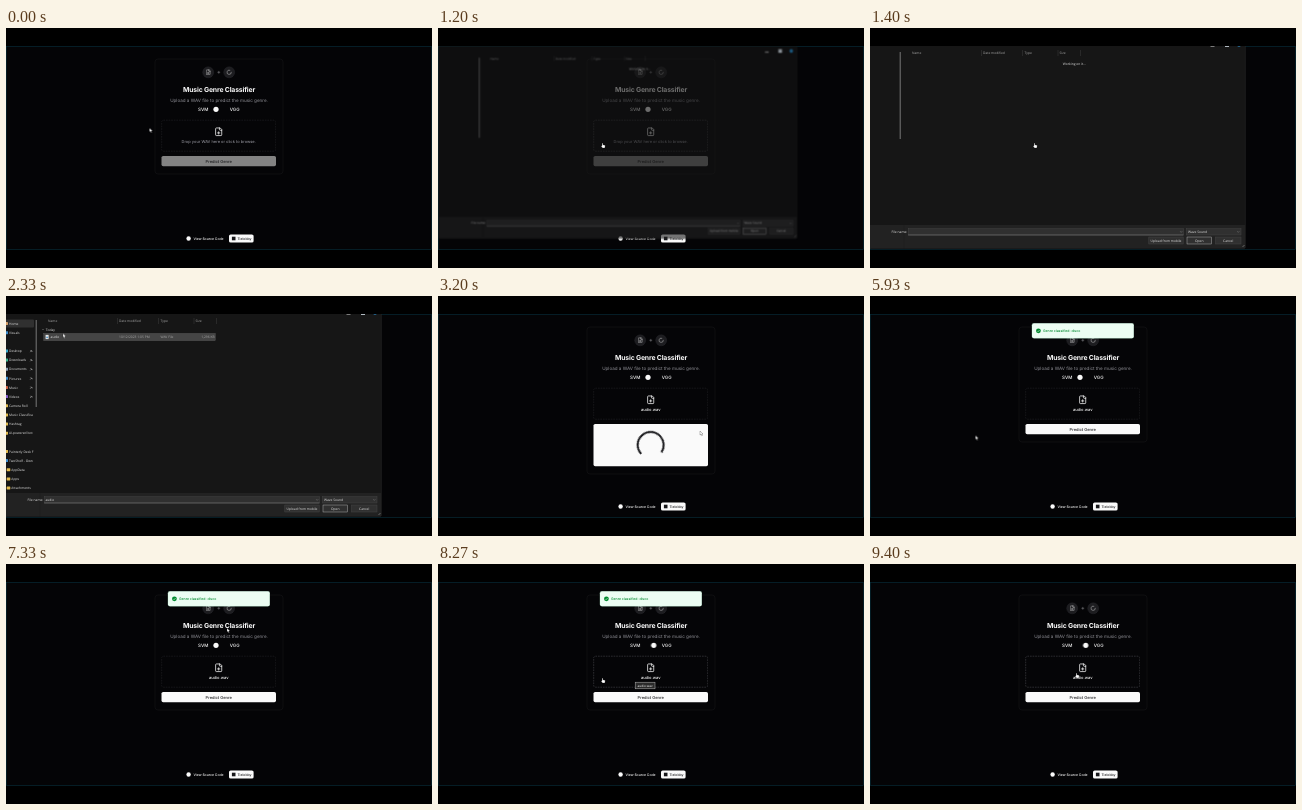
Recreate the animation shown at these times as an HTML page. Size 426 by 240 pixels, loop 9.47 s.

```html
<!DOCTYPE html>
<html lang="en">
<head>
<meta charset="utf-8">
<title>Music Genre Classifier</title>
<style>
html, body { margin: 0; width: 100%; height: 100%; overflow: hidden; background: #000; }
svg { display: block; width: 100vw; height: 100vh; }
text { font-family: Inter, sans-serif; fill: #fafafa; text-rendering: geometricPrecision; }
.mid { text-anchor: middle; }
.end { text-anchor: end; }
.title { font-size: 6.86px; font-weight: 700; letter-spacing: -.025em; }
.lead { font-size: 4.57px; fill: #929299; }
.opt { font-size: 4.57px; font-weight: 500; }
.body { font-size: 4px; }
.strong { font-weight: 500; }
.foot { font-size: 3.43px; font-weight: 500; }
.ink { fill: #18181b; }
.line { fill: none; stroke: #fafafa; stroke-width: 2; stroke-linecap: round; stroke-linejoin: round; }
.win text { font: 3.3px "Open Sans", "Noto Sans", sans-serif; fill: #e4e4e4; }
.win .dim { fill: #a8a8a8; }
.field { fill: #303030; stroke: #4a4a4a; stroke-width: .4; }

/* One shared 9.47 s timeline */
.card, .btn, .thumb, .zone, .before, .after, .wait, .list, .picked,
.idle, .busy, .tip, .arrow, .hand { animation: 9470ms step-end infinite; }
.card, .btn { height: var(--h); }
.card { --h: 115px; animation-name: grow; }
.btn { --h: 10.3px; fill: #838383; animation-name: grow, enable; }
.thumb { animation-name: toggle; }
.zone { stroke: #222225; animation-name: hover; }
.before { animation-name: before; }
.after { animation-name: after; }
.wait { animation-name: wait; }
.list { animation-name: list; }
.picked { animation-name: picked; }
.idle { animation-name: idle; }
.busy { animation-name: busy; }
.tip { animation-name: tip; }
.arrow { animation-name: arrow; }
.hand { animation-name: hand; }
.spin { animation: spin 947ms linear infinite; }
.win { transform-origin: 170px 95px; animation: win 9470ms linear infinite; }
.toast { animation: toast 9470ms ease infinite; }
.cursor { animation: cursor 9470ms ease-in-out infinite; }

@keyframes grow { 0%, 48.57%, 100% { height: var(--h); } 33.79% { height: calc(var(--h) + 32px); } }
@keyframes enable { 0% { fill: #838383; } 29.2%, 100% { fill: #fafafa; } }
@keyframes toggle { 0% { transform: none; } 77.8%, 100% { transform: translateX(5.7px); } }
@keyframes hover {
  0%, 14.9%, 87.9% { stroke: #222225; }
  2.2%, 81%, 99.26%, 100% { stroke: #46464b; }
}
@keyframes hand { 0%, 14.9%, 87.9% { opacity: 0; } 2.2%, 81%, 99.26%, 100% { opacity: 1; } }
@keyframes arrow { 0%, 14.9%, 87.9% { opacity: 1; } 2.2%, 81%, 99.26%, 100% { opacity: 0; } }
@keyframes before { 0% { opacity: 1; } 29.2%, 100% { opacity: 0; } }
@keyframes after { 0% { opacity: 0; } 29.2%, 100% { opacity: 1; } }
@keyframes wait { 0% { opacity: 1; } 14.8%, 100% { opacity: 0; } }
@keyframes list { 0% { opacity: 0; } 14.8%, 100% { opacity: 1; } }
@keyframes picked { 0% { opacity: 0; } 21.75%, 100% { opacity: 1; } }
@keyframes idle { 0%, 48.57%, 100% { opacity: 1; } 33.79% { opacity: 0; } }
@keyframes busy { 0%, 48.57%, 100% { opacity: 0; } 33.79% { opacity: 1; } }
@keyframes tip { 0%, 90.07%, 100% { opacity: 0; } 85.6% { opacity: 1; } }
@keyframes spin { to { transform: rotate(360deg); } }
@keyframes win {
  0%, 11.6% { opacity: 0; transform: scale(.9); }
  12.67% { opacity: .62; transform: scale(.92); }
  14.1%, 29.15% { opacity: 1; transform: none; }
  30.4%, 100% { opacity: 0; transform: scale(.93); }
}
@keyframes toast {
  0%, 48.92% { opacity: 0; transform: translateY(-15px); }
  53.15%, 91.3% { opacity: 1; transform: none; }
  93.6%, 100% { opacity: 0; transform: translateY(-15px); }
}
@keyframes cursor {
  0%, 1.37% { transform: translate(143.5px, 100px); }
  7.08%, 8.45% { transform: translate(233px, 112px); }
  9.19%, 11.3% { transform: translate(207px, 107px); }
  12.67%, 14.8% { transform: translate(164px, 115px); }
  21.1%, 24.7% { transform: translate(57px, 37.5px); }
  28.5%, 29.57% { transform: translate(329px, 211px); }
  32.42%, 36.64% { transform: translate(262px, 135px); }
  46.46%, 61.98% { transform: translate(104px, 139.5px); }
  62.62%, 71.07% { transform: translate(105.5px, 139.5px); }
  73.92% { transform: translate(218px, 36px); }
  75.3%, 77.4% { transform: translate(221px, 64px); }
  78.14%, 79.5% { transform: translate(214px, 80px); }
  81.84% { transform: translate(230px, 105px); }
  83.42%, 85.85% { transform: translate(200px, 112px); }
  87.33% { transform: translate(164px, 114px); }
  90.07%, 91.5% { transform: translate(118px, 112px); }
  93.66%, 98.52% { transform: translate(124px, 112px); }
  99.26%, 100% { transform: translate(206px, 109px); }
}
</style>
</head>
<body>
<svg viewBox="0 0 426 240">
  <defs>
    <clipPath id="screen"><rect y="18" width="426" height="204"/></clipPath>
    <g id="file" class="line">
      <path d="M15 2H6a2 2 0 0 0-2 2v16a2 2 0 0 0 2 2h12a2 2 0 0 0 2-2V7Z"/>
      <path d="M14 2v4a2 2 0 0 0 2 2h4M9 15h6M12 18v-6"/>
    </g>
  </defs>
  <rect width="426" height="240"/>
  <g clip-path="url(#screen)">
    <rect x=".4" y="18.3" width="425.2" height="203.2" fill="#040406" stroke="#08303c" stroke-width=".6"/>

    <!-- Card -->
    <rect class="card" x="149" y="31" width="128" rx="3" fill="#050507" stroke="#18181b" stroke-width=".5"/>
    <g fill="#1d1d20" stroke="#2c2c30" stroke-width=".4">
      <circle cx="202.2" cy="44.3" r="5.5"/>
      <circle cx="223.2" cy="44.3" r="5.5"/>
    </g>
    <g opacity=".8">
      <use href="#file" transform="translate(199.3 41.4) scale(.24)"/>
      <path class="line" transform="translate(220.3 41.4) scale(.24)" d="M21 12a9 9 0 1 1-6.2-8.6"/>
    </g>
    <path d="M211.4 44.3h2.8M212.8 42.9v2.8" stroke="#8a8a90" stroke-width=".5"/>
    <text class="title mid" x="213" y="64.2">Music Genre Classifier</text>
    <text class="lead mid" x="213" y="73.6">Upload a WAV file to predict the music genre.</text>
    <text class="opt mid" x="197.2" y="83">SVM</text>
    <text class="opt mid" x="228.7" y="83">VGG</text>
    <circle class="thumb" cx="210" cy="81.3" r="2.6" fill="#fafafa"/>

    <rect class="zone" x="155.7" y="92.2" width="114" height="31" rx="1.7" fill="none" stroke-width=".6" stroke-dasharray="1.7 .9"/>
    <use href="#file" transform="translate(208.1 99.2) scale(.381)"/>
    <text class="body mid before" x="212.7" y="114.7" style="fill:#a1a1aa">Drop your WAV here or click to browse.</text>
    <text class="body strong mid after" x="212.7" y="114.7">audio.wav</text>

    <rect class="btn" x="155.5" y="127.9" width="114.5" rx="1.7"/>
    <text class="body strong mid ink idle" x="212.7" y="134.5">Predict Genre</text>
    <g class="busy">
      <g transform="translate(212.7 149)">
        <circle class="spin" r="13" fill="none" stroke="#18181b" stroke-width="2" stroke-dasharray="58 24"/>
      </g>
    </g>

    <!-- Footer links -->
    <circle cx="182.6" cy="210.5" r="2.2" fill="#fafafa"/>
    <text class="foot" x="187.4" y="211.7">View Source Code</text>
    <rect x="223" y="206.4" width="24.6" height="8.2" rx="1.7" fill="#fafafa"/>
    <rect x="225.9" y="208.7" width="3.6" height="3.6" fill="#18181b"/>
    <text class="foot ink" x="231.4" y="211.7">Tielobby</text>

    <!-- Toast -->
    <g class="toast">
      <rect x="162" y="27.2" width="101.8" height="15" rx="2" fill="#ecfdf3" stroke="#bffcd9" stroke-width=".3"/>
      <circle cx="168.4" cy="34.8" r="2.4" fill="#008a2e"/>
      <path d="M167.3 34.9l.8.8 1.5-1.7" fill="none" stroke="#ecfdf3" stroke-width=".55"/>
      <text class="foot" x="173" y="36" style="fill:#008a2e">Genre classified: disco</text>
    </g>

    <!-- File dialog -->
    <g class="win">
      <rect x="-14" y="10" width="389.4" height="210.4" rx="1.5" fill="#161616" stroke="#333" stroke-width=".4"/>
      <path d="M-14 197H375.2V220.2H-14Z" fill="#222"/>
      <rect x="355" y="14.8" width="4" height="4" fill="#d8e3ec"/>
      <rect x="340.5" y="17.4" width="4" height="1.2" fill="#bbb"/>
      <circle cx="369" cy="16.7" r="2" fill="#2b8cc9"/>
      <path d="M30.2 24V111" stroke="#929292" stroke-width=".8"/>
      <path d="M34 21v200" stroke="#1e1e1e" stroke-width=".4"/>
      <path d="M111.5 22v6M152.5 22v6M188 22v6M210.5 22v6" stroke="#484848" stroke-width=".4"/>
      <text class="dim" x="42" y="26.2">Name</text>
      <text class="dim" x="113" y="26.2">Date modified</text>
      <text class="dim" x="154.5" y="26.2">Type</text>
      <text class="dim" x="189.5" y="26.2">Size</text>
      <text class="wait" x="192.8" y="37.2">Working on it...</text>
      <g class="list">
        <g id="side"><rect x="-10" y="23.4" width="38" height="8.2" rx="1" fill="#303030"/></g>
        <rect class="picked" x="37.7" y="37.4" width="171.6" height="7.3" fill="#454545" stroke="#5b5b5b" stroke-width=".4"/>
        <path d="M36.2 33.2l.8.8.8-.8" fill="none" stroke="#aaa" stroke-width=".4"/>
        <text x="39.8" y="34.7">Today</text>
        <rect x="39.6" y="38.9" width="3" height="4.2" fill="#e6e6e6"/>
        <circle cx="41.1" cy="41.3" r=".9" fill="#4a8fc4"/>
        <text x="44.6" y="42.2">audio</text>
        <text class="dim" x="113" y="42.2">10/12/2023 1:05 PM</text>
        <text class="dim" x="154.5" y="42.2">WAV File</text>
        <text class="dim end" x="208.6" y="42.2">1,296 KB</text>
      </g>
      <text x="21.5" y="205">File name:</text>
      <rect class="field" x="38.2" y="200.6" width="275.3" height="6.4"/>
      <path d="M38.2 207h275.3" stroke="#999" stroke-width=".4"/>
      <text class="picked" x="39.5" y="205">audio</text>
      <rect class="field" x="316.5" y="200.6" width="54.5" height="6.4"/>
      <text x="318" y="205">Wave Sound</text>
      <path d="M310.3 203.4l.9.9.9-.9M367.4 203.4l.9.9.9-.9" fill="none" stroke="#aaa" stroke-width=".4"/>
      <rect class="field" x="278.8" y="209" width="34.4" height="7"/>
      <rect class="field" x="317" y="209" width="24.5" height="7" style="stroke:#c8c8c8"/>
      <rect class="field" x="345.5" y="209" width="25.5" height="7"/>
      <text class="mid" x="296" y="213.7">Upload from mobile</text>
      <text class="mid" x="329.2" y="213.7">Open</text>
      <text class="mid" x="358.2" y="213.7">Cancel</text>
      <path d="M372.5 219l2-2" stroke="#aaa" stroke-width=".5"/>
    </g>

    <g class="tip">
      <rect x="197.2" y="118.2" width="19.8" height="6.6" fill="#2b2b2b" stroke="#b5b5b5" stroke-width=".5"/>
      <text class="mid" x="207.1" y="122.7" style="font:3.2px 'Open Sans',sans-serif">audio.wav</text>
    </g>

    <g class="cursor" fill="#fff" stroke="#000" stroke-width=".25">
      <path class="arrow" d="M0 0V4.1L1 3.2 1.7 4.7 2.4 4.4 1.7 3H3Z"/>
      <path class="hand" d="M0 .4Q.5-.3.9.4V1.8L2.8 2.2Q3.3 2.4 3.2 3L2.8 5H.5L-1 3.1Q-.7 2.5 0 3.1Z"/>
    </g>
  </g>
</svg>
<script>
const side = document.getElementById('side');
const rows = ['Home', 'Visuals', '', 'Desktop', 'Downloads', 'Documents', 'Pictures', 'Music', 'Videos',
  'Camera Roll', 'Music Classifica', 'Hashtag', 'AI-powered bot', '', 'Painterly Desk F', 'TwoShelf - Own',
  'AppData', 'Apps', 'Attachments'];
const tints = { 0: '#d9a066', 1: '#3f8fd0', 3: '#39a9c9', 4: '#38b48b', 5: '#8fa3b5', 6: '#3f8fd0',
  7: '#d0603f', 8: '#8a5fd0', 15: '#3f8fd0' };

function add(tag, attrs, label = '') {
  const el = document.createElementNS('http://www.w3.org/2000/svg', tag);
  for (const key in attrs) el.setAttribute(key, attrs[key]);
  el.textContent = label;
  side.append(el);
}

rows.forEach((label, i) => {
  if (!label) return;
  const y = 27.5 + 9.14 * i;
  const nested = i > 15 ? 2.3 : 0;
  add('rect', { x: nested - 1.6, y: y - 1.5, width: 3.6, height: 3, rx: .4, fill: tints[i] || '#e3bb4e' });
  add('text', { x: 3 + nested, y: y + 1.2 }, label);
  if (i > 2 && i < 9) {
    add('path', { d: `M24.2 ${y + 1.2}l1-1m-.7-.9l1.6 1.6m-.9-1.7l1.2 1.2`, stroke: '#bbb', 'stroke-width': .6 });
  }
});
</script>
</body>
</html>
```
